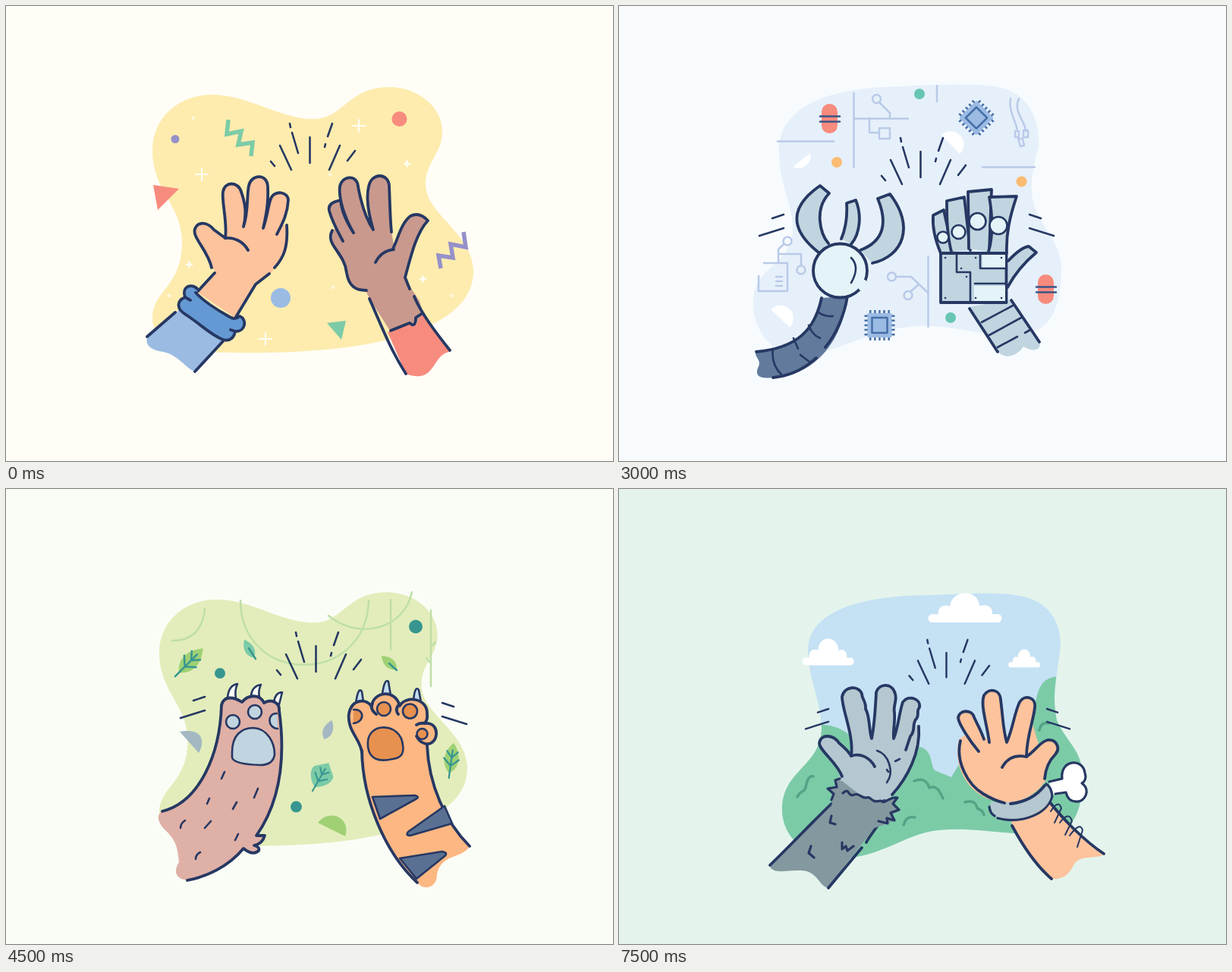
Recreate the animation shown at these times as an HTML page. Size 800 by 600 pixels, loop 9000 ms.

```html
<!DOCTYPE html>
<html lang="en">
<head>
<meta charset="utf-8">
<title>High fives</title>
<style>
html,body{margin:0;width:100%;height:100%;overflow:hidden}
svg{display:block;width:100vw;height:100vh}
.scene{animation:show 9s step-end infinite;animation-delay:calc(var(--i)*1.5s - 9s)}
@keyframes show{0%{visibility:visible}16.6666%,100%{visibility:hidden}}
path,circle,ellipse,rect{stroke-linecap:round;stroke-linejoin:round}
.k,.o,.t{stroke:#263863;stroke-width:3.8}
.t{stroke-width:2.6}
.k,.t,.line{fill:none}
.line{stroke-width:2.5}
.white{fill:#fff}.red{fill:#f78b7e}.purple{fill:#9590c9}.blue{fill:#9bbbe3}.denim{fill:#6599d3}
.green{fill:#7ccba7}.skin{fill:#fcc39d}.brown{fill:#c9998d}.steel{fill:#c0d5df}.slate{fill:#84989f}
.teal{fill:#37968f}.leaf{fill:#9fd174}.pink{fill:#f8b4ae}.sand{fill:#fdeaa8}
</style>
</head>
<body>
<svg viewBox="0 0 800 600" preserveAspectRatio="none">
<defs>
<path id="blob" d="M193 190C193 150 225 117 272 117C320 117 360 149 405 149C445 149 450 107 505 107C545 107 575 135 575 165C575 195 553 205 553 235C553 275 616 300 616 350C616 400 560 430 480 445C420 457 340 458 290 457C240 456 193 445 193 412C193 375 232 370 232 312C232 262 193 245 193 190Z"/>
<path id="rays" class="t" d="M349 205l5 6M361 184l15 32M374 155l1 5M377 167l8 27M400.5 173v34M430 155l-6 17M421 182l-1 4M440 184l-14 32M460 191l-10 13"/>
<path id="swishL" class="t" d="M0 28l32-10M17 5l15-5"/>
<path id="swishR" class="t" d="M0 0l15 5M0 18l32 10"/>
<path id="plus" d="M-8 0H8M0-8V8" fill="none" stroke="#fffdf6" stroke-width="2.2"/>
<g id="capsule"><rect class="red" x="267" y="129" width="21" height="39" rx="10.5"/><path class="line" stroke="#3a5688" d="M265 145.5h26M265 152.5h26"/></g>
<g id="chip" fill="none" stroke="#466fa8"><path style="stroke-linecap:butt" stroke-width="40" stroke-dasharray="2.5 3.6" d="M-13.5 0H13.5M0-13.5V13.5"/><rect x="-16" y="-16" width="32" height="32" rx="1" fill="#9bbbe3" stroke="none"/><rect x="-10" y="-10" width="20" height="20" stroke-width="2.5"/></g>
<path id="leaf" d="M0 20C-15 8-13-10 0-25C13-10 15 8 0 20Z"/>
<path id="veins" class="line" stroke="#37968f" d="M0 27V-14M-8-12L0-3 8-12M-11-1L0 9 11-1"/>
<path id="fish" d="M0 0H47V8C35 2 32 19 17 18C5 17 0 8 0 0Z"/>
<path id="cloud" class="white" d="M6 39A5.5 5.5 0 0 1 6 28H14C12 18 23 14 29 18C31-5 67-6 68 17C79 14 86 19 85 28H92A5.5 5.5 0 0 1 92 39Z"/>
<clipPath id="sea"><path d="M225 205C227 160 265 132 310 132C365 133 410 174 460 174C495 172 505 140 548 140C595 140 624 168 624 202C620 235 598 240 598 270C600 318 654 342 654 392C648 435 590 462 520 474C450 484 380 482 310 478C250 470 212 445 212 418C213 385 258 370 258 318C257 275 225 255 225 205Z"/></clipPath>
<clipPath id="land"><path d="M249 215C247 165 310 140 410 140C480 137 520 134 550 148C580 164 584 195 581 215C577 250 570 270 577 305C590 335 612 345 611 382C610 425 600 455 560 455C500 456 470 445 420 450C375 455 345 487 290 487C240 485 213 455 215 418C218 370 266 365 267 315C265 275 251 255 249 215Z"/></clipPath>
</defs>

<g class="scene" style="--i:0">
<rect width="800" height="600" fill="#fffdf6"/>
<use href="#blob" fill="#fdecae"/>
<use href="#plus" x="465" y="158"/><use href="#plus" x="258" y="222"/><use href="#plus" x="342" y="439"/>
<path class="line" stroke="#fffdf6" d="M525 208h7m-3.5-3.5v7M238 341h7m-3.5-3.5v7M546 360h7m-3.5-3.5v7"/>
<path class="line" stroke="#fff8df" style="stroke-width:4.5" d="M247 148h.1M215 382h.1M587 382h.1M431 371h.1M427 222h.1"/>
<circle class="red" cx="518.5" cy="149" r="10"/><circle class="purple" cx="223" cy="175.500" r="5.500"/><circle class="blue" cx="362" cy="385" r="13"/>
<path class="red" d="M194 236l34 5-28 28z"/><path class="green" d="M423 418l25-3-6 25z"/>
<g fill="none" stroke-width="5.500" style="stroke-linejoin:miter"><path style="stroke-linecap:butt;stroke-linejoin:miter" stroke="#7ccba7" d="M293 150l-2 19 19-4-4 18 19-3-2 18"/><path style="stroke-linecap:butt;stroke-linejoin:miter" stroke="#9590c9" d="M603 298l3 20-20-4 3 18-19-3 3 17"/></g>
<use href="#rays"/>
<path class="skin" d="M271 345L290 300 316 285 340 288 370 289C372 320 365 337 349 352L329 367 302 411 252 377 276 350Z"/>
<path class="o skin" d="M271 345C266 322 245 305 249 294C253 284 265 284 274 295L289 306C292 285 284 258 286 245C288 231 306 231 310 245C316 262 317 275 313 291C320 270 317 250 320 237C323 222 344 220 345 238C346 260 343 275 339 293C345 275 345 265 349 254C354 242 372 245 372 256C371 275 364 287 357 301"/>
<path class="k" d="M289 306C302 305 313 311 319 322M370 289C372 318 366 332 354 345M347 353L329 367 303 410M275 352L253 376"/>
<path class="blue" d="M232 397L186 437C183 449 193 454 207 456C227 460 237 478 249 482L294 435Z"/>
<path class="k" d="M223 404L186 436M287 441L249 482"/>
<path class="o denim" d="M254 375C246 364 231 369 236 384C224 389 225 400 237 407C257 420 270 434 286 440C296 443 301 436 302 429C316 430 318 413 308 409C302 414 298 412 293 409C277 400 262 391 250 378"/>
<path class="k" d="M236 384L243 388M302 429L296 427"/>
<path class="brown" d="M431 297L450 270 480 290 508 298 512 320 526 345V360L545 389 550 406 539 421 506 428 479 386 474 375C455 375 450 362 447 346C440 328 425 320 431 297Z"/>
<path class="o brown" d="M458 299C447 282 442 268 441 256C432 258 424 261 426 270C430 285 437 297 444 310"/>
<path class="o brown" d="M458 299C447 280 438 255 440 238C443 223 463 222 464 238C468 260 474 280 484 295C478 275 474 255 478 238C482 219 504 220 505 237C506 258 506 278 508 298"/>
<path class="o brown" d="M510 320C517 306 521 286 533 277Q545 271 556 283C541 299 534 328 526 358L532 373"/>
<path class="k" d="M487 338C492 328 501 322 511 321M430 296C420 315 446 324 449 352C452 370 461 375 475 375"/>
<path class="red" d="M503 430L533 418 540 421 549 405 585 456C565 459 566 485 546 488Q538 489 527 485Z"/>
<path class="k" d="M479 386C494 420 507 454 527 485M538 383C547 405 566 430 585 454M507 428L532 418Q540 425 540 411L549 405"/>
</g>

<g class="scene" style="--i:1">
<rect width="800" height="600" fill="#5a7092"/>
<path fill="#3c5e82" d="M176 215C178 165 220 125 275 126C330 137 370 136 410 127C450 115 480 92 525 91C580 92 603 125 603 160C601 240 548 265 548 312C550 345 566 350 567 380C565 430 530 447 465 458C420 467 350 468 290 464C240 458 208 440 208 395C210 360 219 340 218 300C216 255 178 245 176 215Z"/>
<circle class="purple" cx="283" cy="183.500" r="23"/><circle class="purple" cx="539" cy="220" r="14"/>
<path class="blue" d="M483 155C481 117 524 117 521 146L518 160Q500 160 483 155Z"/>
<g class="line" stroke="#364a6e"><path d="M261 190C246 198 244 206 256 205C284 202 320 175 318 166Q315 161 300 167M478 139C465 136 462 142 468 153C482 175 531 182 536 164Q537 157 525 150M468 142C470 153 505 171 529 163M526 128l13-5M541 143l31-14M547 156l12-5"/><path d="M384 437C362 444 341 425 350 403L378 371C384 366 391 370 387 376L375 389 401 368C407 363 414 368 409 374L389 393 402 384C409 380 415 385 411 391L397 405 408 400C416 398 416 405 412 409Z"/></g>
<path class="t" d="M504 132Q518 135 514 152M532 209Q540 219 551 214M527 214Q537 227 552 224M529 223Q535 231 547 230"/>
<circle class="red" cx="370.500" cy="415.500" r="17.500"/>
<g fill="none" stroke="#eaf4f8"><path stroke-width="4" d="M211 178h.1M245 248h.1M576 191h.1M556 114h.1M541 333h.1M335 447h.1M240 347h.1"/><path stroke-width="8" d="M255.500 241h.1M447 233h.1M564.500 177h.1M547 352h.1M443 416h.1"/></g>
<use href="#rays" x="-9" y="11"/><use href="#swishL" x="217" y="268"/><use href="#swishR" x="521" y="268"/>
<path fill="#c0d5df" d="M252 378L178 452C170 468 187 467 202 467C232 470 220 489 222 500C226 506 238 505 246 499L325 409Z"/>
<path class="k" d="M249 382L198 432M191 439L180 450M322 413L263 480M257 488L241 501"/>
<path class="slate" d="M236 402L246 418 214 455 201 438Z"/><path class="red" d="M227 409L238 420 217 442 207 432Z"/>
<path class="t" d="M231 406L236 403 246 418 214 455 203 437 223 414M238 421L222 437"/>
<path class="o slate" d="M261 355C250 365 247 381 253 388C275 408 306 418 326 413Q336 406 332 384"/>
<path class="t" d="M263 374l-5 13M276 382l-4 17M290 387l-3 19M304 389l-1 20M318 387l2 21"/>
<path fill="#dce9ef" d="M260 350L290 300 315 290 372 303C379 325 370 352 350 369C328 390 290 390 271 372Z"/>
<path class="o" fill="#dce9ef" d="M271 372C262 350 244 325 247 312C251 301 264 303 271 311L286 324C288 300 274 272 276 260C279 247 296 247 299 258C306 275 311 290 312 309C317 285 316 265 320 252C324 239 341 240 342 253C343 270 337 290 336 311C345 298 346 285 350 275C356 264 375 268 373 280C371 300 365 312 359 327"/>
<path class="k" d="M286 324Q303 321 312 331M316 338l1 2M372 304C378 323 373 340 365 350M356 362C336 386 294 394 271 372"/>
<path class="blue" d="M474 407C490 445 515 472 547 486L552 467C530 448 512 425 501 402Z"/>
<path class="green" d="M499 413L505 414C520 442 544 459 568 465L559 470H546C523 455 509 436 499 413Z"/>
<path class="k" d="M475 406L482 418M488 430C505 460 526 474 546 486M505 414C521 442 542 459 566 464"/><path class="t" d="M500 414C514 441 531 458 550 470M520 430l-7 4M534 447l-6 4M550 458l-4 5"/>
<path class="o denim" d="M457 388L462 407Q488 407 509 395L503 379Z"/>
<path class="green" d="M427 337L450 300 475 290 510 320 530 308C532 335 524 362 510 376C490 394 460 391 440 379C425 367 422 349 427 337Z"/>
<path class="o green" d="M427 337C412 310 408 265 417 248Q424 239 432 249C445 268 452 285 455 305"/>
<path class="o green" d="M464 315C463 290 470 245 480 235Q485 230 491 237C505 260 510 295 505 321C512 300 526 297 530 308C531 325 529 335 526 345"/>
<path class="k" d="M427 337C421 360 430 380 452 386C473 393 494 389 506 380M514 367l4-6M443 321C455 314 475 313 487 318M476 346C482 337 490 333 500 336"/>
</g>

<g class="scene" style="--i:2">
<rect width="800" height="600" fill="#f7fbfe"/>
<path fill="#e6f0fa" d="M211 200C205 140 260 108 370 106C420 103 480 102 500 107C540 115 555 150 553 185C545 215 542 235 545 255C555 295 583 310 583 345C583 385 575 430 530 433C480 437 440 420 395 422C330 425 280 462 235 461C190 458 172 410 178 380C185 340 230 340 229 290C226 255 213 235 211 200Z"/>
<g class="line" stroke="#b9cae8"><path d="M209 178.500h74M309.500 115v98M419 105v21M310 148.500h71M479 212.500h69M407.500 330v93M343 127l14 14v7M330 148v19h13v-6h14v14h-14v-8M217 314l-7 7v17M210 327h30v15M191 339h31v37h-38v-20M207 357h8M207 363h8M207 369h8M365 357h20l23 22M385 376l10-9M516 122C513 140 524 152 525 165M527 122C519 140 536 152 536 165M522 165h5v8h-5zM533 164h6v9h-6zM526 175h6l2 9-5 1z"/><circle cx="339.500" cy="122.500" r="5.500"/><circle cx="222" cy="310" r="5.500"/><circle cx="240" cy="348" r="5.500"/><circle cx="359.500" cy="357" r="5.500"/><circle cx="381" cy="381.500" r="5.500"/></g>
<path class="white" d="M229 212L252 194A16 16 0 0 1 229 212M425 170L449 195A16 16 0 0 0 425 170M200 400L225 424A16 16 0 0 0 200 400"/>
<g fill="#67c5b3"><circle cx="396" cy="116" r="7"/><circle cx="437" cy="411" r="7"/></g><g fill="#fbbb73"><circle cx="287" cy="206" r="7"/><circle cx="530.500" cy="231.500" r="7"/></g>
<use href="#capsule"/><use href="#capsule" x="285" y="225"/>
<use href="#chip" x="343.500" y="421"/><use href="#chip" transform="translate(471 147.500)rotate(45)"/>
<use href="#rays" x="-3" y="19"/><use href="#swishL" x="185" y="275"/><use href="#swishR" x="541" y="275"/>
<path fill="#627b9d" d="M267 385C260 425 235 450 181 456C177 462 188 466 184 475C179 486 182 492 203 490C260 487 295 440 301 383Z"/>
<path class="k" d="M267 385C258 427 235 451 181 456M301 383C297 408 286 433 272 450M260 464C243 480 224 488 203 490"/><path class="t" d="M262 403Q270 410 282 409M250 421Q254 433 265 438M230 438l6 14M239 460l13 10M203 452Q200 472 214 486"/>
<g class="o steel"><path d="M263 325C225 295 224 265 265 237L277 247C257 268 265 300 276 313"/><path d="M293 307C300 290 301 275 300 260L312 256C320 275 318 300 306 314"/><path d="M318 322C350 310 354 285 341 254L357 248C390 290 375 330 334 339"/></g>
<circle fill="#e4f3f8" class="o" cx="291.500" cy="349" r="35.500"/><path class="t" d="M306 332Q318 344 306 365"/>
<path stroke="#e4f3f8" stroke-width="6" d="M323 364l-4 8"/>
<path class="steel" d="M461 397L499 455C510 469 527 459 533 449C544 456 556 455 555 444L517 387Z"/>
<path class="k" d="M462 399L499 456M517 388L554 443"/><path class="t" d="M478 417L521 394M488 434L530 411M499 450L525 436M535 431l7-4"/>
<g class="o steel"><path d="M424 326C416 307 413 290 414 276L428 269 440 324"/><path d="M438 324C432 300 432 275 432 257L455 252 463 322"/><path d="M461 320L460 245 491 242 488 324"/><path d="M487 324C494 300 492 275 488 252L524 251C515 278 510 300 511 326"/><path d="M513 336Q530 318 540 317L550 325Q526 345 512 371"/><rect x="424" y="326" width="86.500" height="65"/></g>
<path fill="#e4f3f8" d="M479 328h30v19h-30zM468 369h41v20h-41z"/>
<path class="t" d="M445 328v23h18v38M476 328v18h33M509 366h-40"/><path class="line" stroke="#263863" d="M430 332h.1M470 332h.1M504 332h.1M451 346h.1M458 357h.1M430 385h.1M504 385h.1M470 385h.1"/>
<g class="t" style="fill:#e4f3f8"><circle cx="427" cy="305" r="7.500"/><circle cx="447.500" cy="298" r="9"/><circle cx="472.500" cy="284" r="11"/><circle cx="500" cy="289.500" r="11.500"/></g>
</g>

<g class="scene" style="--i:3">
<rect width="800" height="600" fill="#fafdf6"/>
<use href="#blob" fill="#e3edbb" transform="translate(16.700 34)scale(.96 .955)"/>
<path class="line" stroke="#bfdfa6" d="M309 147C310 260 475 260 478 147M425 167C465 200 525 185 535 136M262 158Q258 200 219 200M507 146v66M560 160v100M560 208l6-6M560 230l-6-7"/>
<g transform="translate(242 228)rotate(45)"><use href="#leaf" class="leaf"/><use href="#veins"/></g>
<g transform="translate(587 357)rotate(8)scale(.9)"><use href="#leaf" class="leaf"/><use href="#veins"/></g>
<g transform="translate(415 379)rotate(30)scale(.82)"><path class="green" d="M0 20C-15 12-22-3-17-10L0-25 17-10C22-3 15 12 0 20Z"/><use href="#veins"/></g>
<use href="#leaf" class="green" transform="translate(321 212)rotate(-28)scale(.6)"/><use href="#leaf" class="leaf" transform="translate(506 230)rotate(-48)scale(.6)"/><use href="#leaf" fill="#a3b8c2" transform="translate(424 319)rotate(22)scale(.6)"/>
<path class="line" stroke="#37968f" d="M320 210l9 14M505 230l10 9"/>
<path fill="#a3b8c2" d="M229 320L254 348C262 335 261 314 229 320"/><path class="leaf" d="M411 440L447 458C455 434 427 420 411 440"/>
<circle class="teal" cx="282" cy="243" r="7"/><circle class="teal" cx="540" cy="181.500" r="9"/><circle class="teal" cx="382.500" cy="419" r="7.500"/>
<use href="#rays" x="8" y="34"/><use href="#swishL" x="230" y="274"/><use href="#swishR" x="575" y="282"/>
<path class="t" style="fill:#fafdf6" d="M292 276Q293 259 305 257Q301 266 303 276ZM323 273Q324 260 336 258Q332 266 334 275ZM353 281Q355 268 364 268L360 284Z"/>
<path fill="#dfb0a6" d="M204 426C255 415 282 350 284 285C287 272 300 274 311 281C320 270 335 271 340 282C350 276 361 282 360 292C368 350 363 410 329 457L341 458 332 467 334 476 325 481 313 475C290 500 265 510 239 516C219 513 223 500 228 492C226 471 224 463 208 448C198 436 200 430 204 426Z"/>
<path class="k" d="M206 425C255 413 282 350 284 285C287 272 300 274 311 281C320 270 335 271 340 282C350 276 361 282 360 292C368 350 363 410 330 457H341Q338 468 327 470Q335 472 333 477Q325 484 313 474C293 498 265 511 239 516"/>
<g class="t" style="fill:#c0d5df"><path d="M298 347C298 325 310 315 326 315C345 316 354 335 354 350Q352 364 335 364Q300 363 298 354Z"/><circle cx="299" cy="307" r="9"/><circle cx="328" cy="294" r="9"/><path d="M357 296C344 295 344 315 358 316"/></g>
<path class="t" d="M288 373l-4 9M268 408l-3 7M332 395l-5 12M304 413l-5 9M236 437q-6 4-6 10M270 438l-8 9M306 455l-4 8M256 479q-6 3-6 9"/>
<path class="t" style="fill:#c5dded" d="M461 283Q464 260 469 267L471 281ZM496 270Q499 249 504 254L507 272ZM537 279Q539 258 544 265L547 281Z"/>
<path fill="#fdb782" d="M469 345C470 410 500 480 542 519C550 530 568 527 568 508C574 480 602 488 611 471C580 440 558 400 555 338L545 290 500 275 455 300Z"/>
<path class="o" fill="#fdb782" d="M469 347C467 330 449 318 452 296C456 276 476 276 482 287C482 269 512 261 519 286C526 272 556 275 555 297Q556 304 552 309C574 307 570 339 553 336Q545 334 541 326"/>
<path class="k" d="M488 297Q479 290 483 283M517 297Q512 291 518 284M552 309Q545 308 541 311M469 345C470 410 500 480 542 519M555 338C557 390 579 439 611 471"/>
<g class="t" style="fill:#e79150"><path d="M477 338C474 306 521 307 523 338Q526 354 510 356Q480 363 477 340Z"/><circle cx="498" cy="290" r="9"/><circle cx="532.500" cy="293" r="9.500"/><circle cx="548.500" cy="323" r="7"/><path d="M458 291C472 289 474 307 458 309"/></g>
<path class="t" style="fill:#5a7092" d="M483 406L539 404Q546 406 540 409L493 435ZM578 418L530 452Q526 457 533 457L588 441ZM519 487L575 478Q584 480 577 485L541 514Z"/>
</g>

<g class="scene" style="--i:4">
<rect width="800" height="600" fill="#cdebef"/>
<g clip-path="url(#sea)"><path fill="#9bd9e0" d="M200 120H660V490H200Z"/><path fill="#82cfd6" d="M200 248C270 225 330 226 390 242C470 270 550 275 660 255V490H200Z"/><path fill="#68c7cd" d="M200 316C280 298 370 308 430 336C500 366 570 370 660 360V490H200Z"/><path fill="#55c4c8" d="M360 405L395 414 470 485H340ZM520 490C560 440 600 426 660 430V490Z"/><path fill="#60c5c9" d="M200 435C285 400 345 425 392 440L450 485H200Z"/></g>
<g fill="none" stroke="#72bccb" stroke-width="2.500"><path d="M353 160H282C283 198 321 190 327 176Q335 164 353 171M295 165v3M597 232H568Q572 245 582 243Q586 233 597 237M590 236v2M628 350H598Q601 363 612 362Q616 351 628 355M604 354v2"/><path stroke="#3cabb2" d="M395 477C381 460 379 443 385 431M395 477C390 455 393 440 396 414M395 477C410 459 411 447 409 437M397 477Q407 475 412 462"/></g>
<g class="sand"><use href="#fish" x="505" y="188"/><use href="#fish" x="413" y="413" transform="translate(0 -.5)"/><use href="#fish" transform="translate(298 260)scale(-1 1)"/></g>
<path class="line" stroke="#dfb963" d="M514 191v2M422 416v2M289 263v2"/>
<path fill="none" stroke="#d99ba8" stroke-width="5" d="M243 378v47M243 410Q228 410 219 406M243 397L231 391M243 394L256 389M243 410L254 407M619 437V380M619 411C600 412 590 405 588 387M603 407Q596 396 598 381M619 406Q638 410 638 390L639 375M619 393Q632 390 630 375M607 394L618 398M588 398L585 386"/>
<use href="#rays" x="43" y="53"/>
<path class="purple" d="M226 446C265 420 310 355 327 318C315 300 313 262 340 259C365 258 378 275 384 300C400 330 398 390 375 430C360 465 335 490 308 527C288 532 290 510 286 496C278 463 240 484 226 446Z"/>
<g fill="#b0aad8"><ellipse cx="340" cy="291" rx="8.500" ry="11"/><ellipse cx="343" cy="335" rx="13" ry="16" transform="rotate(45 343 335)"/><ellipse cx="295" cy="404" rx="12" ry="15" transform="rotate(20 295 404)"/><ellipse cx="260" cy="444" rx="12" ry="17" transform="rotate(45 260 444)"/><ellipse cx="296" cy="445" rx="6" ry="10" transform="rotate(50 296 445)"/></g>
<path class="k" d="M226 446C265 420 310 355 327 308M328 318C306 296 318 258 344 259C364 261 372 272 379 289M391 327C397 350 393 367 388 376M380 414C373 432 368 440 362 449M331 499L309 527"/>
<g class="o" fill="#d5d5ec"><path d="M372 294C376 286 389 289 394 298C402 313 402 330 390 331C373 332 363 306 372 294Z"/><path d="M365 371C376 359 395 363 399 379C402 397 390 414 375 413C356 411 354 385 365 371Z"/><path d="M327 452C343 433 371 440 371 459C371 479 357 499 336 498C314 496 313 467 327 452Z"/></g>
<g fill="#263863"><ellipse cx="383" cy="311" rx="9" ry="14" transform="rotate(-18 383 311)"/><ellipse cx="382" cy="390" rx="9" ry="15" transform="rotate(22 382 390)"/><ellipse cx="349" cy="472" rx="11" ry="18" transform="rotate(35 349 472)"/></g>
<path class="t" d="M384 299l7 8M384 378l8 4M354 458l11 4"/>
<path class="red" d="M537 474C560 464 578 462 592 469C587 480 605 493 606 505C586 517 562 520 540 516Z"/>
<path class="t" d="M539 472C560 462 580 464 592 469M606 505C582 517 559 520 541 516M550 480Q561 475 574 475M582 474l4 1M572 515C576 503 579 514 583 505"/>
<path class="red" d="M459 373C453 410 470 445 493 462L539 463C558 440 565 405 579 376L525 358Z"/>
<path class="o pink" style="stroke-width:3" d="M459 373C465 300 510 254 563 266C520 288 510 330 523 361Q514 354 508 361Q490 381 459 373Z"/>
<path class="o pink" style="stroke-width:3" d="M523 361C550 350 571 315 571 290C595 310 596 340 578 376C568 375 561 383 552 374C545 367 538 374 529 370"/>
<path class="k" style="stroke-width:3" d="M459 373C454 415 470 446 494 464M523 361C526 370 536 371 544 372C554 375 553 390 567 410M578 376C566 403 559 440 539 463"/>
<path class="red" d="M526 370Q540 369 546 374C554 378 554 395 565 411L540 460 510 420Z"/>
<path class="k" style="stroke-width:2.600" d="M523 359C524 373 538 369 547 374C556 379 551 396 567 411M575 306L559 335M556 341l-3 4M578 376Q576 372 573 372 575 365 570 361M475 440Q480 432 481 419M480 428l8-6M479 430l-4-6"/>
<ellipse class="o pink" cx="518" cy="486.500" rx="23" ry="37" transform="rotate(-35 518 486.500)"/><path class="t" d="M513 497C522 514 535 512 537 500"/>
</g>

<g class="scene" style="--i:5">
<rect width="800" height="600" fill="#e4f4ec"/>
<g clip-path="url(#land)"><path fill="#c5e1f4" d="M200 120H630V500H200Z"/><path class="green" d="M200 350C240 305 280 300 310 330C340 355 370 338 385 340C415 335 410 365 416 371L438 380 450 360C480 325 525 340 545 305C551 275 549 245 585 247L630 260V500H200Z"/><path fill="none" stroke="#53a486" stroke-width="3.500" d="M235 406C240 395 245 403 247 389Q250 377 256 379M389 385Q404 379 409 394C420 390 423 400 427 408M375 443Q379 430 390 433M456 413Q470 409 472 421Q480 424 481 430M554 318Q557 306 567 309"/></g>
<use href="#cloud" x="407" y="137"/><use href="#cloud" transform="translate(310 197)scale(-.7 .91)"/><use href="#cloud" transform="translate(513 211)scale(.43 .62)"/>
<use href="#rays" transform="translate(51 51.600)scale(.95)"/><use href="#swishL" transform="translate(246 290)scale(.94)"/><use href="#swishR" transform="translate(564 290)scale(.94)"/>
<path class="slate" d="M282 413L198 497C205 509 219 502 240 503C262 504 263 523 275 526L345 436 368 425 361 410 290 384Z"/>
<path class="k" d="M280 415C255 439 226 470 199 496M340 445C331 458 327 463 326 466M320 473L276 526"/>
<path fill="#b5c7d0" d="M290 378L300 350 330 325 396 311C397 350 378 390 356 408Q340 417 318 404L294 400Z"/>
<path class="o" fill="#b5c7d0" d="M294 379C287 360 264 345 264 335C266 322 283 324 290 335Q302 345 306 352C310 325 294 292 294 274C297 259 316 259 320 270C320 277 326 280 325 290C331 300 329 317 333 329C337 310 338 287 339 268C343 256 360 255 364 270C367 279 361 285 363 295C364 309 361 317 362 329C368 315 369 296 374 281C381 271 398 276 396 288C391 293 397 299 391 304C386 312 391 319 384 326Q381 335 378 344"/>
<path class="k" d="M306 352C317 348 330 353 337 366M395 313C398 348 379 382 360 403M350 411l-6 2"/><path class="t" d="M340 345C356 350 363 374 353 387M353 370l2 3M364 359l6-3"/>
<path class="slate" d="M294 385L285 384 288 392 275 394 283 402 280 418 337 447 362 438 357 428 369 422 361 416 367 407 345 412 317 403Z"/>
<path class="t" style="stroke-width:3.200" d="M291 382L285 384 287 393 275 395 283 402 280 410M295 401C304 394 300 402 307 404C318 399 319 409 326 407C333 404 331 415 345 411C350 417 356 405 367 407L361 415 369 423 358 427 363 437 353 434 354 441 342 438M280 431l-2 9 7 2M294 466v9l5-4 2 6 8-6M253 471l-3 9 7 6"/>
<path class="white" d="M567 386L584 382C581 357 611 354 614 374Q617 384 610 388C623 397 613 413 604 412Q592 413 589 400L570 404Z"/>
<path class="t" style="stroke-width:3.200" d="M567 386L584 382C581 357 611 354 614 374Q617 384 610 388C623 397 613 413 604 412Q592 413 589 400L575 402"/>
<path class="skin" d="M516 437C528 465 550 500 570 514C584 516 594 508 599 496C608 481 628 489 639 482C614 462 584 435 566 410Z"/>
<path class="k" d="M518 444C532 470 550 497 570 514M567 412C584 434 612 463 639 481"/><path class="t" style="stroke-width:2" d="M569 425Q579 409 583 421L574 440M581 440Q593 424 597 438L588 456M594 457Q608 438 611 450L604 472"/>
<path fill="#b5c7d0" d="M490 412C515 418 550 406 565 388L572 401C566 425 535 438 508 437Q488 432 490 412Z"/>
<path class="t" style="stroke-width:3.200" d="M488 419Q489 428 495 431M499 434C532 443 566 427 571 405Q570 393 563 389"/>
<path class="skin" d="M448 330L470 315 485 330 515 335 545 310 560 360 562 385C545 410 515 420 485 408C455 395 440 360 448 330Z"/>
<path class="o skin" d="M474 346C462 332 448 310 447 302C448 291 465 290 468 301C472 310 477 318 481 330"/>
<path class="o skin" d="M488 334C485 310 476 285 481 272C488 261 503 265 503 278C506 300 506 317 511 334C519 317 521 295 528 281C535 270 550 275 548 288C546 307 537 327 537 353C548 346 555 333 565 331C577 330 582 342 575 350C565 360 562 370 561 382"/>
<path class="k" d="M505 367C512 354 523 350 537 353M450 332C443 360 460 390 480 402Q495 411 508 414M516 415C535 413 551 404 561 391"/>
</g>
</svg>
</body>
</html>
```
